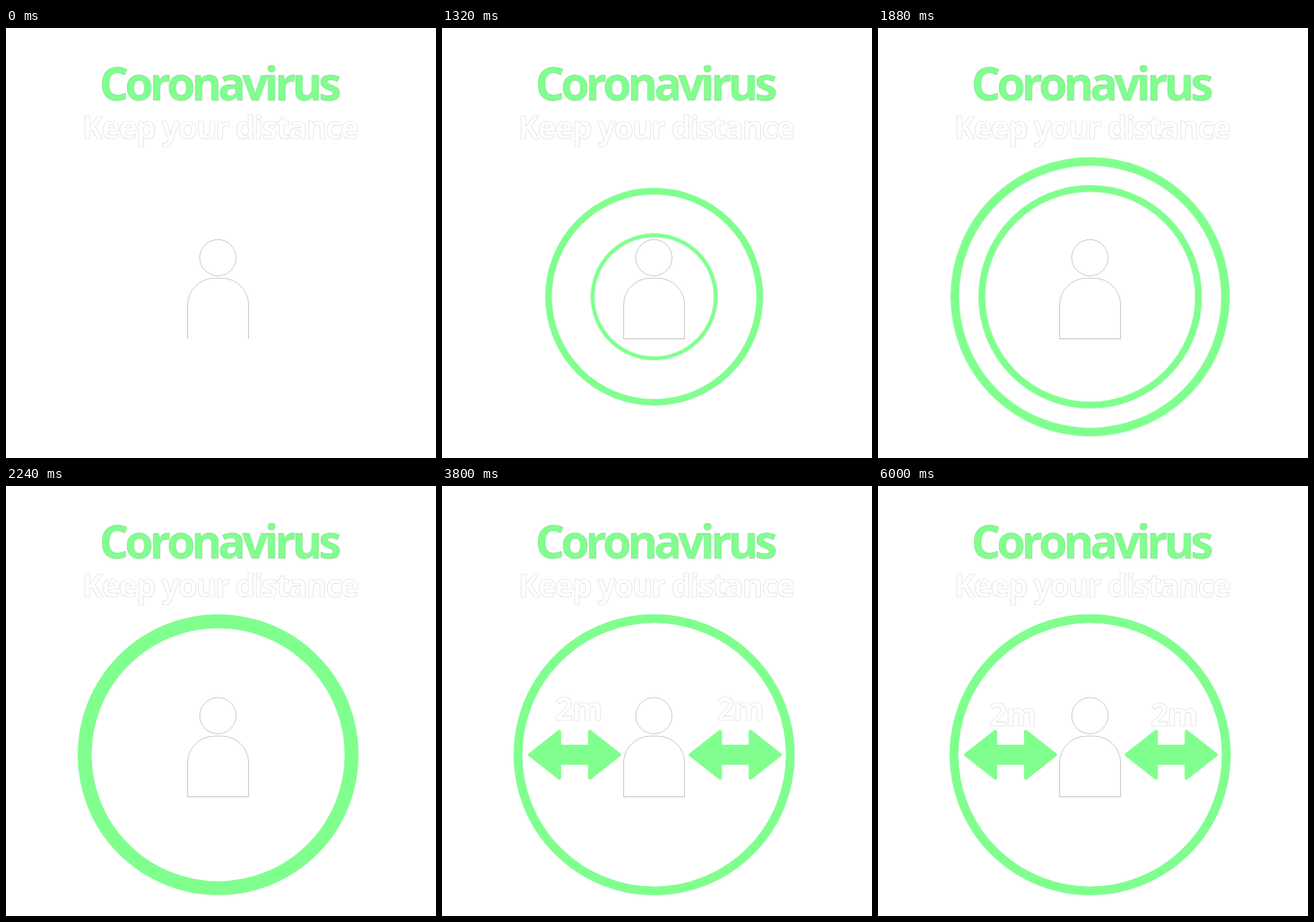
An HTML page that plays this animation: 600 px wide and 600 px high, repeating every 6.04 s.

```html
<!DOCTYPE html>
<html lang="en">
<head>
<meta charset="utf-8">
<title>Keep your distance</title>
<style>
  :root { --green: #80ff8e; --loop: 6040ms; }
  html, body { margin: 0; width: 100%; height: 100%; overflow: hidden; background: #fff; }
  svg { display: block; width: 100vw; height: 100vh; }

  text { font-family: "Open Sans", "Noto Sans", sans-serif; font-weight: 700; font-kerning: none; }
  .title { font-size: 64px; letter-spacing: -5.1px; fill: var(--green); stroke: rgba(0, 0, 0, .25); stroke-width: .4; }
  .pale { font-size: 44px; letter-spacing: -1.95px; fill: #fff; stroke: #d4d4d4; stroke-width: .6; }

  .person { fill: #fff; stroke: #aaa; stroke-width: .7; }
  .ring { fill: none; stroke: var(--green); stroke-width: 12; animation: grow var(--loop) linear infinite both; }
  .second { animation-delay: 520ms; }
  .arrow { fill: var(--green); stroke: var(--green); stroke-width: 5; stroke-linejoin: round;
           animation: open var(--loop) linear infinite both; }
  .label { animation: settle var(--loop) linear infinite both; }
  .gate { animation: gate var(--loop) step-end infinite; }
  .base { stroke: #999; animation: base var(--loop) step-end infinite; }

  @keyframes grow {
    0% { transform: scale(0); }
    7.28% { transform: scale(.245); }
    10.6% { transform: scale(.352); }
    15.89% { transform: scale(.551); }
    21.19% { transform: scale(.755); }
    26.49% { transform: scale(.915); }
    28.48% { transform: scale(.959); }
    31.6%, 100% { transform: scale(1); }
  }
  /* Keeps the delayed ring from lingering into the next loop. */
  @keyframes gate {
    0% { visibility: hidden; }
    8.61%, 100% { visibility: visible; }
  }
  @keyframes base {
    0% { visibility: hidden; }
    9.27%, 100% { visibility: visible; }
  }
  @keyframes open {
    0%, 41.06% { transform: scale(0); animation-timing-function: ease-in-out; }
    56.29%, 100% { transform: scale(1); }
  }
  @keyframes settle {
    0%, 52.98% { transform: translate(9px, -24px); opacity: 0; }
    56.29% { opacity: 1; }
    62.91% { transform: translate(3px, -8px); animation-timing-function: ease-out; }
    72.85%, 100% { transform: none; opacity: 1; }
  }
</style>
</head>
<body>
<svg viewBox="0 0 600 600">
  <defs>
    <path id="arrow" d="M-62.3 0 L-21.2 -32.2 V-11.5 H21.2 V-32.2 L62.3 0 L21.2 32.2 V11.5 H-21.2 V32.2 Z"/>
  </defs>

  <text class="title" x="130.3" y="100.6">Coronavirus</text>
  <text class="pale" x="106.3" y="155">Keep your distance</text>

  <g transform="translate(296 375)">
    <circle class="ring" r="190"/>
    <g class="gate"><circle class="ring second" r="190"/></g>
  </g>

  <g transform="translate(185 375)"><use class="arrow" href="#arrow"/></g>
  <g transform="translate(409.2 375)"><use class="arrow" href="#arrow"/></g>

  <g class="label">
    <text class="pale" x="155" y="335">2m</text>
    <text class="pale" x="380.3" y="335">2m</text>
  </g>

  <g class="person">
    <path d="M253.5 434 V386 A38 37 0 0 1 291.5 349 H300.5 A38 37 0 0 1 338.5 386 V434"/>
    <circle cx="295.7" cy="320.5" r="25.3"/>
    <path class="base" d="M253.5 433.7 H338.5"/>
  </g>
</svg>
</body>
</html>
```
